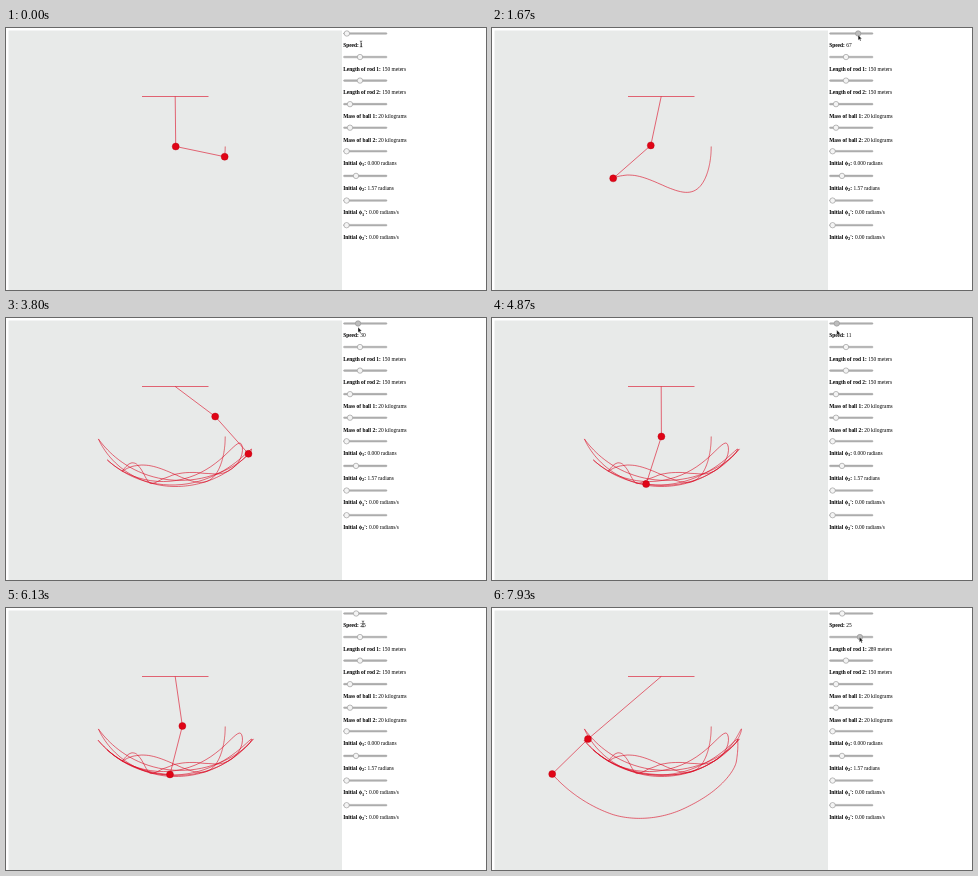
These frames come from a looping animation (480x262 px, 8000 ms). An HTML page:

```html
<!DOCTYPE html>
<html lang="en">
<head>
<meta charset="utf-8">
<title>Double pendulum</title>
<style>
  html, body { margin: 0; width: 100%; height: 100%; overflow: hidden; background: #fff; }
  svg { display: block; width: 100vw; height: 100vh; }
  text { font: 5.42px "Liberation Serif", "Times New Roman", serif; }
  .label { font-weight: bold; }
  .sub { font-size: 4.4px; }
  .track { fill: #b0b0b0; stroke: #999; stroke-width: .4; }
  .thumb { fill: #f4f4f4; stroke: #909090; stroke-width: .6; }
  .thumb.active { fill: #bdbdbd; }
  .line { fill: none; stroke: #dc0a22; stroke-width: .6; stroke-linejoin: round; }
  .ball { fill: #e00416; stroke: #b8000e; stroke-width: .4; }
</style>
</head>
<body>
<svg viewBox="0 0 480 262">
  <rect x="2.5" y="2.5" width="333.5" height="260" fill="#e8eae9"/>
  <path class="line" d="M136 68.5H202.5"/>
  <path class="line" id="trail"/>
  <path class="line" id="rods"/>
  <circle class="ball" id="ball1" r="3.5"/>
  <circle class="ball" id="ball2" r="3.5"/>
  <g id="panel"></g>
  <path id="arrow" d="M0 0V5.2L1.2 4.1L2 6L2.9 5.6L2.1 3.8H3.7Z" fill="#111" stroke="#fff" stroke-width=".3"/>
  <path id="beam" d="M-1.2 -3Q0 -3 0 -2.2Q0 -3 1.2 -3M0 -2.4V2.4M-1.2 3Q0 3 0 2.2Q0 3 1.2 3" fill="none" stroke="#222" stroke-width=".6"/>
</svg>
<script>
const LOOP = 8000, FRAME = 1000 / 15, PIVOT = { x: 169.2, y: 68.5 }, ROD2 = 50;
const { sin, cos, min, max } = Math;
const el = id => document.getElementById(id);
const set = (node, attrs) => { for (const k in attrs) node.setAttribute(k, attrs[k]); };
const clamp = u => min(1, max(0, u));

// Piecewise linear lookup of column `col` in rows [time, ...values]
function lerp(rows, t, col = 1) {
  let i = 1;
  while (i < rows.length - 1 && rows[i][0] < t) i++;
  const a = rows[i - 1], b = rows[i];
  return a[col] + (b[col] - a[col]) * clamp((t - a[0]) / (b[0] - a[0]));
}

// Control panel: thumb x, label, subscript, label end, value
const controls = [
  [341, "Speed", "", ":", ""],
  [354, "Length of rod 1", "", ":", ""],
  [354, "Length of rod 2", "", ":", "150 meters"],
  [344, "Mass of ball 1", "", ":", "20 kilograms"],
  [344, "Mass of ball 2", "", ":", "20 kilograms"],
  [340.6, "Initial ϕ", "1", ":", "0.000 radians"],
  [350, "Initial ϕ", "2", ":", "1.57 radians"],
  [340.6, "Initial ϕ", "1", "':", "0.00 radians/s"],
  [340.6, "Initial ϕ", "2", "':", "0.00 radians/s"]
];
el("panel").innerHTML = controls.map(([x, label, sub, end, value], i) => {
  const y = 5.5 + 23.55 * i + max(0, i - 5) * 1.1;
  const bold = (text, extra) => `<tspan class="label" ${extra}>${text}</tspan>`;
  const name = sub
    ? bold(label, "") + `<tspan class="label sub" dy="1.2">${sub}</tspan>` + bold(end, 'dy="-1.2"')
    : bold(label + end, "");
  return `<rect class="track" x="337.5" y="${y - .8}" width="43.5" height="1.6" rx=".8"/>
    <circle class="thumb" cx="${x}" cy="${y}" r="2.7"/>
    <text x="337.2" y="${y + 13.8}">${name} <tspan class="value">${value}</tspan></text>`;
}).join("");
const thumbs = document.querySelectorAll(".thumb");
const values = document.querySelectorAll(".value");

const speedKeys = [[0, 1], [1100, 1], [1200, 12], [1670, 67], [2400, 87], [2930, 87],
  [3800, 30], [4870, 11], [5400, 25]];
const speed = t => lerp(speedKeys, t);
const rodLength = t => 150 + 139 * (1 - (1 - clamp((t - 6870) / 690)) ** 1.6);
const speedX = t => 340.5 + .385 * speed(t);
const lengthX = t => 354 + .1 * (rodLength(t) - 150);

const pointerKeys = [[400, 355, 16], [1000, 341, 7], [2900, 341, 7], [4870, 345, 12],
  [5400, 350, 10], [5900, 357, 16], [6200, 357, 16], [6600, 354, 29]];
function pointer(t) {
  const x = t > 6600 ? lengthX(t) - .5 : t > 1000 && t < 5400 ? speedX(t) : lerp(pointerKeys, t, 1);
  return [x, lerp(pointerKeys, t, 2)];
}

// First swing: equations of motion, paced by the speed slider
const poses = [], STEP = 2, SWING_END = 2100;
let a1 = 0, a2 = Math.PI / 2, w1 = 0, w2 = 0;
for (let t = -640; t <= SWING_END; t += STEP) {
  if (t % 20 === 0) poses.push([t, a1, a2]);
  const dt = STEP * (t < 0 ? .001 : .00013 * speed(t));
  const s = sin(a1 - a2), c = cos(a1 - a2);
  const pull = s * w1 * w1 - sin(a2);
  const acc1 = (-s * w2 * w2 - 2 * sin(a1) - c * pull) / (2 - c * c);
  w1 += acc1 * dt;
  w2 += (pull - c * acc1) * dt;
  a1 += w1 * dt;
  a2 += w2 * dt;
}

// Later swings ease between key poses: time, angle of rod 1, angle of rod 2
poses.push(
  [2200, .3, 1.394], [2463, -.747, -.747], [2765, .7, 1.06], [2800, .84, .707],
  [3125, -.596, -1.348], [3415, .1, .1], [3800, .927, .728], [3990, .895, .895],
  [4870, 0, -.315], [5440, -.881, -.881], [6130, .14, -.255], [6700, .7, 1.284],
  [7000, .75, .7], [7270, .3, 0], [7600, -.4, -.43], [7930, -.859, -.793]);

// Slope at a pose: level at turning points, harmonic mean of both sides elsewhere
function slope(i, col) {
  const rate = k => (poses[k + 1][col] - poses[k][col]) / (poses[k + 1][0] - poses[k][0]);
  const last = poses.length - 1;
  if (i === 0) return rate(0);
  if (i === last) return rate(last - 1);
  const a = rate(i - 1), b = rate(i);
  return a * b > 0 ? 2 * a * b / (a + b) : 0;
}

function angle(t, i, col) {
  const a = poses[i], b = poses[i + 1], h = b[0] - a[0], u = (t - a[0]) / h, v = 1 - u;
  return v * v * ((1 + 2 * u) * a[col] + u * h * slope(i, col)) +
    u * u * ((1 + 2 * v) * b[col] - v * h * slope(i + 1, col));
}

function pose(t) {
  let i = 0;
  while (i < poses.length - 2 && poses[i + 1][0] <= t) i++;
  const p = angle(t, i, 1), q = angle(t, i, 2), rod1 = rodLength(t) / 3;
  const x1 = PIVOT.x + rod1 * sin(p), y1 = PIVOT.y + rod1 * cos(p);
  return { x1, y1, x2: x1 + ROD2 * sin(q), y2: y1 + ROD2 * cos(q) };
}

const point = p => p.x2.toFixed(2) + " " + p.y2.toFixed(2);
const trail = [];
for (let t = -640; t <= LOOP; t += 8) trail.push([t, point(pose(t))]);

function draw(t) {
  const p = pose(t);
  const past = trail.filter(k => k[0] <= t).map(k => k[1]);
  set(el("trail"), { d: "M" + past.join("L") + "L" + point(p) });
  set(el("rods"), { d: `M${PIVOT.x} ${PIVOT.y}L${p.x1} ${p.y1}L${point(p)}` });
  set(el("ball1"), { cx: p.x1, cy: p.y1 });
  set(el("ball2"), { cx: p.x2, cy: p.y2 });

  set(thumbs[0], { cx: speedX(t) });
  set(thumbs[1], { cx: lengthX(t) });
  thumbs[0].classList.toggle("active", t > 1000 && t < 5400);
  thumbs[1].classList.toggle("active", t > 6600);
  values[0].textContent = Math.round(speed(t));
  values[1].textContent = Math.round(rodLength(t)) + " meters";

  const [x, y] = pointer(t), overText = y > 13 && y < 21;
  const transform = `translate(${x} ${y})`;
  set(el("arrow"), { transform, visibility: overText ? "hidden" : "visible" });
  set(el("beam"), { transform, visibility: overText ? "visible" : "hidden" });
}

function tick() {
  const t = performance.now() % LOOP;
  draw(Math.floor(t / FRAME + .07) * FRAME);
  requestAnimationFrame(tick);
}
tick();
</script>
</body>
</html>
```
